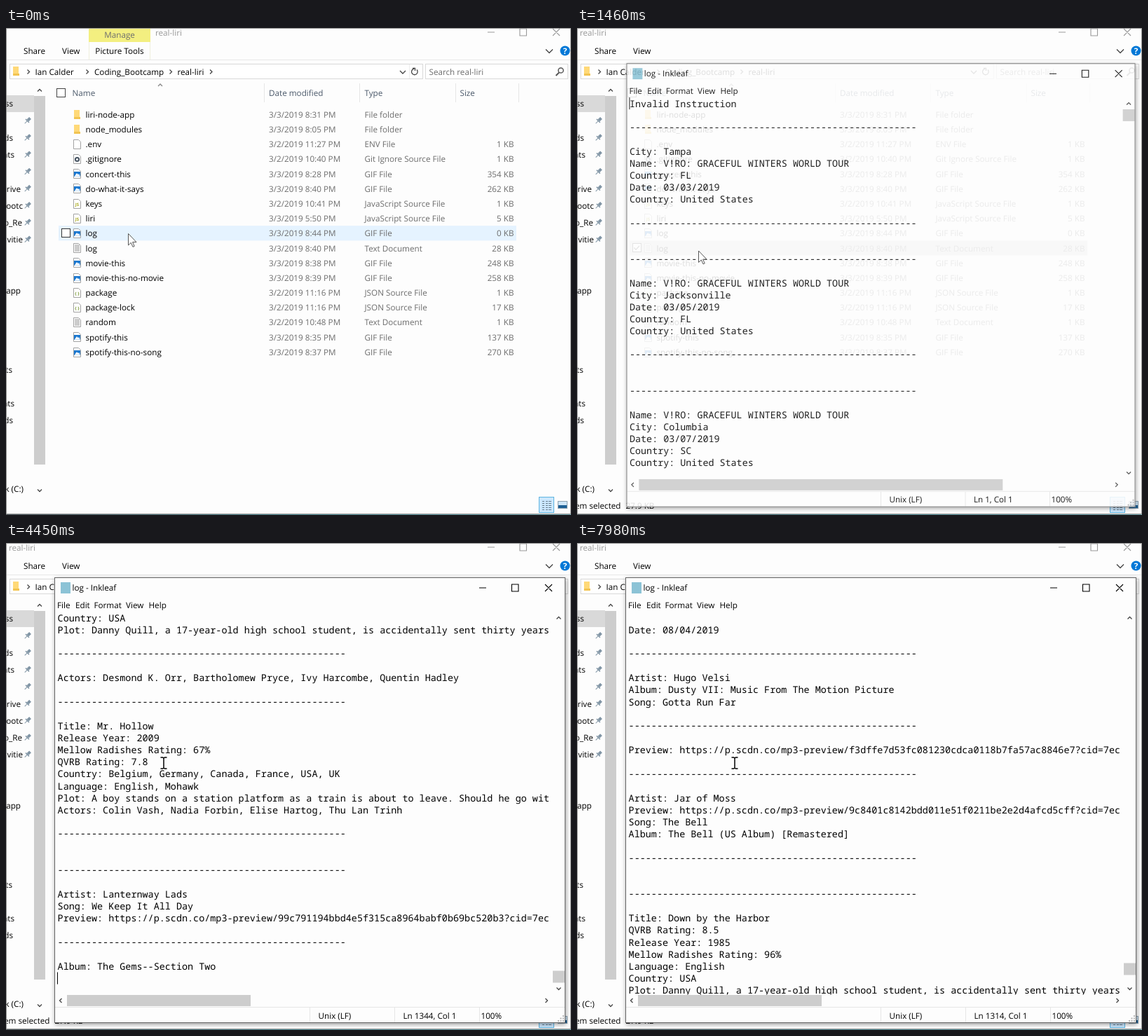
Recreate the animation shown at these times as an HTML page. Size 806 by 695 pixels, loop 8000 ms.

```html
<!DOCTYPE html>
<html lang="en">
<head>
<meta charset="utf-8">
<title>Log viewer</title>
<style>
html, body { margin: 0; width: 100%; height: 100%; overflow: hidden; background: #fff; }
svg { display: block; width: 100vw; height: 100vh; }
text { font: 11.7px "Open Sans", "Noto Sans", sans-serif; text-rendering: geometricPrecision; fill: #000; }
path { fill: none; }
text.grey { fill: #6d6d6d; }
.head text { fill: #4c5a6b; }
.mid { text-anchor: middle; }
.end { text-anchor: end; }
.mono text { font: 13.443px "Noto Sans Mono", "DejaVu Sans Mono", monospace; }
text.tiny { font-size: 6px; font-weight: 700; }
#win { transform-origin: 433.5px 367px; }
#frame { filter: drop-shadow(1px 2px 3px #0006); }
</style>
</head>
<body>
<svg id="stage" viewBox="0 0 806 695"></svg>
<script>
const LOOP = 8000, PITCH = 21.19, LINE = 17.15;

const text = (x, y, s, cls = '', more = '') => `<text x="${x}" y="${y}" class="${cls}" ${more}>${s}</text>`;
const rect = (x, y, w, h, fill, more = '') => `<rect x="${x}" y="${y}" width="${w}" height="${h}" fill="${fill}" ${more}/>`;
const box = (x, y, w, h, stroke, fill = 'none') => rect(x + .5, y + .5, w - 1, h - 1, fill, `stroke="${stroke}"`);
const path = (d, stroke = '#444', width = 1, fill = 'none') =>
  `<path d="${d}" style="stroke:${stroke};stroke-width:${width};fill:${fill}"/>`;
const group = (id, body, more = '') => `<g id="${id}" ${more}>${body}</g>`;
const arrowUp = (x, y, color) => path(`M${x - 3} ${y + 1.5}l3-3 3 3`, color, 1.3);
const arrowDown = (x, y, w = 3) => path(`M${x - w} ${y - w / 2}l${w} ${w} ${w}-${w}`, '#444', 1.3);
const arrowRight = (x, y) => path(`M${x - 1.5} ${y - 3}l3 3-3 3`, '#444', 1.3);
const arrowLeft = (x, y) => path(`M${x + 1.5} ${y - 3}l-3 3 3 3`, '#444', 1.3);
const buttons = (x, y, gap, color) =>
  path(`M${x} ${y}h10M${x + gap} ${y - 5}h9.5v10h-9.5zM${x + 2 * gap + 1} ${y - 5}l10 10m0-10l-10 10`, color, 1.1);

// ---- file list ----
const page = y => path(`M96.5 ${y - 6.5}h7l3 3v10h-10z`, '#a3a3a3', 1, '#fff');
const icons = {
  dir: y => rect(97, y - 7, 8, 13, '#ffd978') + rect(97, y + 3, 9, 3, '#f2c452'),
  env: page,
  git: y => page(y) + `<circle cx="101.5" cy="${y + .5}" r="2.6" fill="none" stroke="#485563" stroke-width="2"/>`,
  img: y => page(y) + rect(97, y - 3, 9, 7, '#1b78d0') + path(`M98 ${y + 3.5}l3-4 2 2 1-1 1.5 3z`, '#fff', .5, '#fff'),
  js: y => page(y) + text(101.5, y + 3, 'JS', 'mid tiny', 'style="fill:#a8a81c"'),
  json: y => page(y) + text(101.5, y + 2.5, '{ }', 'mid tiny', 'style="fill:#7c9a3c"'),
  txt: y => page(y) + path([-4, -2, 0, 2, 4].map(d => `M98 ${y + d}h7`).join(''), '#999')
};
const kinds = {
  dir: 'File folder', env: 'ENV File', git: 'Git Ignore Source File', img: 'GIF File',
  js: 'JavaScript Source File', json: 'JSON Source File', txt: 'Text Document'
};
const files = `liri-node-app|3 8:31|dir
node_modules|3 8:05|dir
.env|2 11:27|env|1
.gitignore|2 10:40|git|1
concert-this|3 8:28|img|354
do-what-it-says|3 8:40|img|262
keys|2 10:41|js|1
liri|3 5:50|js|5
log|3 8:44|img|0
log|3 8:40|txt|28
movie-this|3 8:38|img|248
movie-this-no-movie|3 8:39|img|258
package|2 11:16|json|1
package-lock|2 11:16|json|17
random|2 10:48|txt|1
spotify-this|3 8:35|img|137
spotify-this-no-song|3 8:37|img|270`.split('\n').map((row, i) => {
  const [name, when, kind, size] = row.split('|'), [day, hour] = when.split(' ');
  const y = 123.5 + PITCH * i, base = y + 4.3;
  return icons[kind](Math.round(y)) + text(113.5, base, name) +
    text(375, base, `3/${day}/2019 ${hour} PM`, 'grey') + text(511.5, base, kinds[kind], 'grey') +
    (size ? text(724.5, base, size + ' KB', 'grey end') : '');
}).join('');

// ---- explorer window ----
const side = [['ss', 10, 108], ['ds', 10, 157], ['nts', 12, 181], ['rive', 21, 230], ['ootc', 24, 254],
  ['o_Re', 23, 278], ['ivitie', 24, 302], ['app', 21, 375], ['ts', 9, 488], ['nts', 12, 536],
  ['ds', 10, 560], ['k (C:)', 25, 658]].map(([s, x, y]) => text(x, y + 4, s, 'end')).join('');
const pin = rect(-2, -5, 4, 5, '#8195a5') + rect(-3.5, 0, 7, 1.5, '#8195a5') + path('M0 1v5', '#8195a5');
const pins = Array.from({ length: 8 }, (_, i) =>
  group('', pin, `transform="translate(31 ${132 + i * 24.2}) rotate(45)"`)).join('');

const ribbon =
  group('manage',
    rect(118, 0, 88, 20, '#f3ef80') + path('M118.5 20v26M205.5 20v26', '#efefdc') +
    text(162, 13.5, 'Manage', 'mid grey') + text(162, 37, 'Picture Tools', 'mid')) +
  text(213, 11, 'real-liri', '', 'id="title"') + text(25, 37, 'Share') + text(80, 37, 'View') +
  group('controls', buttons(687, 6, 46, 'currentColor')) +
  arrowDown(775, 33, 5) + '<circle cx="797.5" cy="32.5" r="7" fill="#0078d7"/>' +
  text(797.5, 36.5, '?', 'mid', 'style="fill:#fff;font-weight:700"') + path('M1 45.5h804', '#e8e8e8');

const address =
  box(5, 51, 590, 22, '#d9d9d9', '#fff') + box(598, 51, 204, 22, '#d9d9d9', '#fff') + path('M575.5 52v20', '#eee') +
  rect(10, 55, 8, 13, '#ffd978') + rect(10, 65, 9, 3, '#f2c452') +
  [32, 116, 235].map(x => arrowRight(x, 62.5)).join('') + group('trail', arrowRight(292.5, 62.5)) +
  text(41.5, 67, 'Ian Calder') + text(126, 67, 'Coding_Bootcamp') + text(244.5, 67, 'real-liri') +
  arrowDown(566, 63, 4) + path('M586 59.5a4.3 4.3 0 1 1-4-1.3M580 57.5h3.5v3.5', '#444', 1.3) +
  text(603.5, 67, 'Search real-liri', 'grey') +
  '<circle cx="791.5" cy="60.5" r="3.6" fill="none" stroke="#555" stroke-width="1.5"/>' + path('M789 63.5l-4.5 4.5', '#555', 2);

const header =
  box(72, 86, 13, 13, '#444', '#fff') + arrowUp(220, 81.5, '#888') +
  path([368, 504, 641, 731].map(x => `M${x + .5} 79v27`).join(''), '#e6e6e6') +
  group('', text(94.5, 97.3, 'Name') + text(375, 97.3, 'Date modified') + text(511.5, 97.3, 'Type') +
    text(647.5, 97.3, 'Size'), 'class="head"');

const sidebar =
  rect(0, 96, 40, 24, '#d9d9d9') + side + pins + rect(40, 80, 16, 590, '#fdfdfd') +
  rect(40, 97, 16, 526, '#cdcdcd') + arrowUp(48, 89) + arrowDown(48, 660);

const footer =
  group('status', text(62.5, 686, '1 item selected', 'end') + text(69.5, 686, '27.9 KB')) +
  box(760, 669, 22, 23, '#5fb4e0', '#cce8ff') +
  path([676, 679, 682, 685, 688].map(y => `M765 ${y - .5}h3m2 0h3m1 0h4`).join(''), '#6a7d8c') +
  box(787, 675, 14, 11, '#8ea2b0', '#cfe6f7') + rect(788, 681, 12, 4, '#1d5f94') +
  rect(0, 693, 806, 2, 'url(#strip)') + box(0, 0, 806, 694, '#8f8f8f');

const explorer =
  rect(0, 0, 806, 695, '#fdfdfd') + ribbon + address + header +
  group('row', rect(75, 0, 653, 21.2, 'currentColor')) + files +
  group('check', box(79, 4, 13, 13, '#333', '#fff') + group('tick', path('M81.5 10.5l2.5 2.8 5-5.5', '#333', 1.2))) +
  sidebar + footer;

// ---- log text; "-" alone stands for a divider ----
const concert = 'V!RO: GRACEFUL WINTERS WORLD TOUR';
const stop = (city, date, state) =>
  `-\n\nName: ${concert}\nCity: ${city}\nDate: ${date}\nCountry: ${state}\nCountry: United States\n`;
const topLog = `Invalid Instruction

-

City: Tampa
Name: ${concert}
Country: FL
Date: 03/03/2019
Country: United States

-


${stop('Jacksonville', '03/05/2019', 'FL')}
-


${stop('Columbia', '03/07/2019', 'SC')}`;

const preview = hash => `Preview: https://p.scdn.co/mp3-preview/${hash}?cid=7ec`;
const endLog = `
Date: 08/04/2019

-

Artist: Hugo Velsi
Album: Dusty VII: Music From The Motion Picture
Song: Gotta Run Far

-

${preview('f3dffe7d53fc081230cdca0118b7fa57ac8846e7')}

-

Artist: Jar of Moss
${preview('9c8401c8142bdd011e51f0211be2e2d4afcd5cff')}
Song: The Bell
Album: The Bell (US Album) [Remastered]

-


-

Title: Down by the Harbor
QVRB Rating: 8.5
Release Year: 1985
Mellow Radishes Rating: 96%
Language: English
Country: USA
Plot: Danny Quill, a 17-year-old high school student, is accidentally sent thirty years

-

Actors: Desmond K. Orr, Bartholomew Pryce, Ivy Harcombe, Quentin Hadley

-

Title: Mr. Hollow
Release Year: 2009
Mellow Radishes Rating: 67%
QVRB Rating: 7.8
Country: Belgium, Germany, Canada, France, USA, UK
Language: English, Mohawk
Plot: A boy stands on a station platform as a train is about to leave. Should he go wit
Actors: Colin Vash, Nadia Forbin, Elise Hartog, Thu Lan Trinh

-


-

Artist: Lanternway Lads
Song: We Keep It All Day
${preview('99c791194bbd4e5f315ca8964babf0b69bc520b3')}

-

Album: The Gems--Section Two
`;
const lines = log => log.split('\n').map((s, i) => {
  const base = 111.5 + i * LINE;
  return s === '-' ? text(73.6, base - .8, '-'.repeat(51)) : s && text(73.6, base, s);
}).join('');

// ---- editor window ----
const editor =
  rect(69, 49, 729, 636, '#fdfdfd', 'id="frame"') +
  rect(78, 56, 14, 16, '#8cc3d6') + text(94.5, 68.3, 'log - Inkleaf') + buttons(675, 64, 46.5, '#000') +
  [['File', 73], ['Edit', 99], ['Format', 125.5], ['View', 171], ['Help', 203.5]].map(([s, x]) => text(x, 93, s)).join('') +
  group('', group('topText', lines(topLog)) + group('endText', lines(endLog)), 'class="mono" clip-path="url(#view)"') +
  rect(73, 98, 1, LINE, '#000', 'id="caret"') +
  arrowUp(788.5, 107) + arrowDown(788.5, 636) +
  group('bars', arrowLeft(78, 653) + arrowRight(771, 653) +
    rect(780, 115, 17, 17, '#cdcdcd', 'id="vThumb"') + rect(87, 645, 521, 16, '#cdcdcd', 'id="hThumb"') +
    path('M70 662.5h727M433.5 663v21M554.5 663v21M675.5 663v21', '#e6e6e6')) +
  text(445.5, 678.5, 'Unix (LF)') + text(566.5, 678.5, '', '', 'id="place"') + text(677.5, 678.5, '100%') +
  [[0, 0], [1, 0], [2, 0], [1, 1], [2, 1], [2, 2]].map(([i, j]) => rect(787 + i * 3.5, 681 - j * 3.5, 2, 2, '#b5b5b5')).join('') +
  box(69, 49, 729, 636, '#666');

const stage = document.getElementById('stage');
stage.innerHTML =
  `<defs><clipPath id="view">${rect(70, 98, 707, 546.5, '#000')}</clipPath>
  <linearGradient id="strip"><stop stop-color="#4d565c"/><stop offset=".5" stop-color="#4f8d97"/><stop offset="1" stop-color="#6fa3ad"/></linearGradient></defs>` +
  explorer + group('win', editor) +
  group('arrow', path('M.5.5V17l3.8-3.6 2.7 6 2.2-1-2.6-5.8h5.4z', '#555', 1, '#fff')) +
  group('beam', path('M-4.5-8h3.2L0-7l1.3-1h3.2M-4.5 8h3.2L0 7l1.3 1h3.2M0-7V7', '#000', 1.5));

const $ = id => document.getElementById(id);
const show = (id, on) => { $(id).style.display = on ? '' : 'none'; };
const move = (id, x, y) => $(id).setAttribute('transform', `translate(${x} ${y})`);
const set = (id, attrs) => { for (const k in attrs) $(id).setAttribute(k, attrs[k]); };
const last = (keys, t) => keys.filter(k => k[0] <= t).pop();

const mouse = [[0, 174, 293], [260, 173.5, 295], [410, 173, 298], [550, 173, 317.5],
  [2160, 187, 322], [2310, 214, 317], [2440, 225, 314]];
const opening = [[0, .967, 0], [1320, .967, .3], [1460, .996, .88], [1600, 1, 1]];
const blinks = [1320, 1880, 2440, 2870, 3440, 4020, 4450, 5010, 5570, 6000, 6410, 6840, 7400, 7980];

function draw(t) {
  const picked = t >= 1200, active = picked && t < 1320;
  show('manage', !picked);
  show('trail', !picked);
  show('status', picked);
  show('tick', picked);
  set('title', { x: picked ? 4 : 213 });
  $('title').style.fill = $('controls').style.color = active ? '#000' : '#999';

  const rowY = 123.5 + PITCH * (t < 550 ? 8 : 9) - 10.8;
  move('row', 0, rowY);
  move('check', 0, Math.round(rowY));
  $('row').style.color = active ? '#cce8ff' : picked ? '#d9d9d9' : '#e5f3ff';

  const [, scale, alpha] = last(opening, t);
  show('win', alpha);
  $('win').style.opacity = alpha;
  $('win').style.transform = `scale(${scale})`;
  show('bars', t >= 1460);

  const atEnd = t >= 4450, pageUp = t >= 6410;
  show('topText', !atEnd);
  show('endText', atEnd);
  move('endText', 0, pageUp ? 0 : -30 * LINE);
  show('caret', blinks.filter(b => b <= t).length % 2);
  set('caret', { y: atEnd ? 612.5 : 98 });
  set('vThumb', { y: pageUp ? 599.5 : atEnd ? 610.5 : 115 });
  set('hThumb', { width: atEnd ? 262 : 521 });
  $('place').textContent = `Ln ${pageUp ? 1314 : atEnd ? 1344 : 1}, Col 1`;

  const [since, x, y] = last(mouse, t), typing = since >= 2160;
  show('arrow', !typing);
  show('beam', typing);
  move(typing ? 'beam' : 'arrow', x, y);
}

function tick() {
  draw(performance.now() % LOOP);
  requestAnimationFrame(tick);
}
tick();
</script>
</body>
</html>
```
